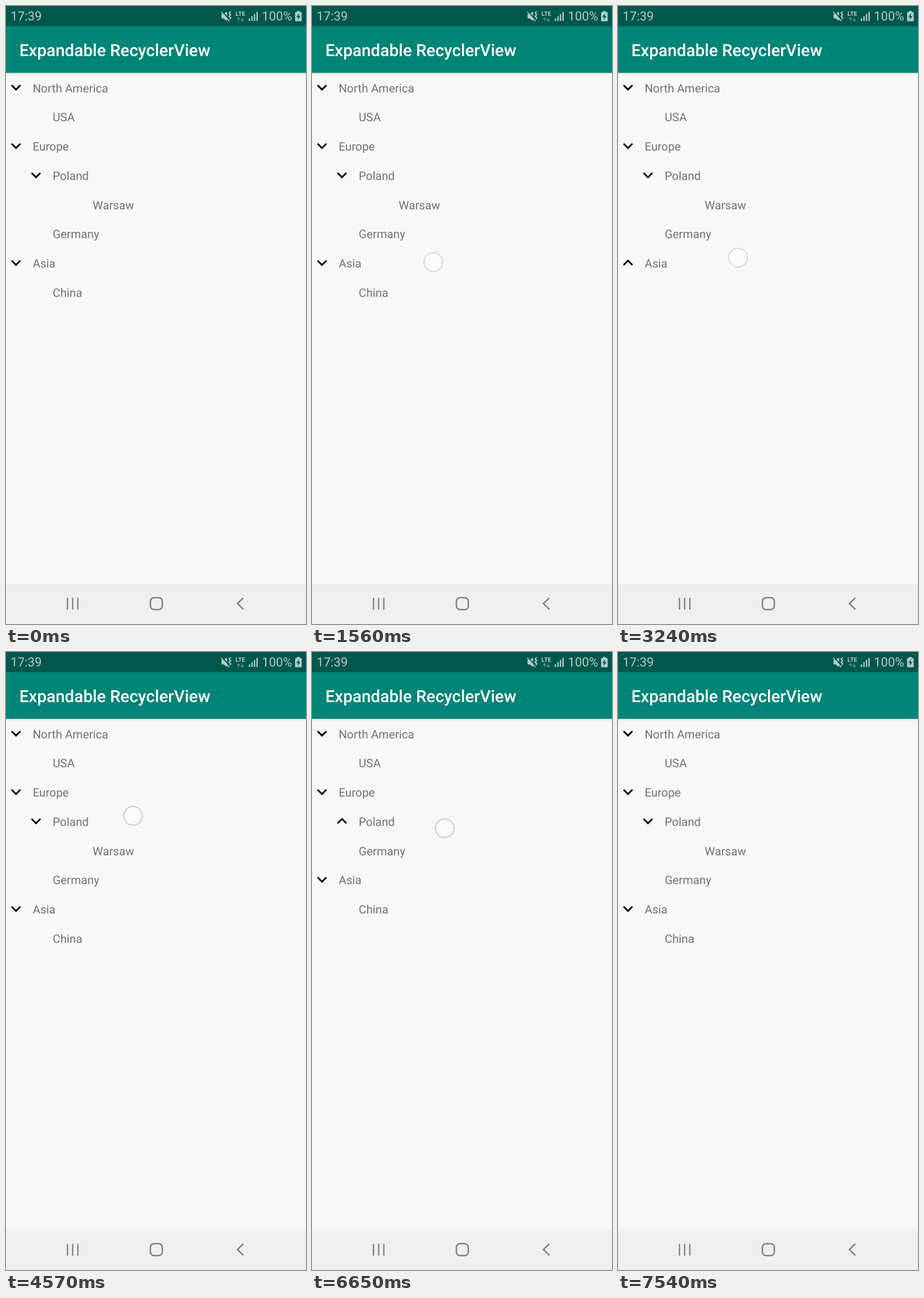
Write an HTML page with a canvas that moves like this. It is 522 px wide and 1073 px high and loops after 8000 ms.

```html
<!DOCTYPE html>
<html lang="en">
<head>
<meta charset="utf-8">
<title>Expandable RecyclerView</title>
<style>
  html, body { margin: 0; width: 100%; height: 100%; overflow: hidden; background: #f8f8f7; }
  canvas { display: block; width: 522px; height: 1073px; }
</style>
</head>
<body>
<canvas id="stage" width="522" height="1073"></canvas>
<script>
const ctx = document.getElementById('stage').getContext('2d');
const LOOP = 8000;
const DP = 1.45;
const ROW = 35 * DP;
const TOP = 116;
const FONT = 'Roboto, sans-serif';
const STATUS_BG = '#00574b';
const STATUS_INK = '#b3cdc9';

// Unhinted glyph spacing, as on a scaled-down phone screen
ctx.textRendering = 'geometricPrecision';

const clamp = v => Math.max(0, Math.min(1, v));
const progress = (t, from, to) => clamp((t - from) / (to - from));
const ease = p => 0.5 - Math.cos(p * Math.PI) / 2;
const mix = (a, b, p) => a + (b - a) * p;
// 1 at rest, drops to 0 over the first span and returns over the second
const dip = (t, a, b, c, d) => 1 - progress(t, a, b) + progress(t, c, d);

// Each touch: start, end, and the points the finger drifts through
const touches = [
  { from: 1330, to: 1970, path: [[211, 445], [211, 444]] },
  { from: 2860, to: 3690, path: [[213, 435], [208.5, 437], [209.5, 438.5]] },
  { from: 4570, to: 4915, path: [[221, 284.5], [228.5, 288]] },
  { from: 5120, to: 5670, path: [[222, 285], [223.5, 286.5], [225, 286]] },
  { from: 6650, to: 7535, path: [[231, 306], [234, 297], [233, 298.5]] }
];

function rect(x, y, w, h, color) {
  ctx.fillStyle = color;
  ctx.fillRect(x, y, w, h);
}

function text(str, x, y, size, color, weight = 400) {
  ctx.font = `${weight} ${size}px ${FONT}`;
  ctx.fillStyle = color;
  ctx.fillText(str, x, y);
}

function trace(points, close) {
  ctx.beginPath();
  points.forEach(([x, y]) => ctx.lineTo(x, y));
  if (close) ctx.closePath();
}

function fillShape(points, color) {
  trace(points, true);
  ctx.fillStyle = color;
  ctx.fill();
}

function strokeLine(points, color, width) {
  trace(points);
  ctx.strokeStyle = color;
  ctx.lineWidth = width;
  ctx.stroke();
}

function roundRect(x, y, w, h, r) {
  ctx.beginPath();
  ctx.roundRect(x, y, w, h, r);
}

function drawMute() {
  fillShape([[375, 14], [378.5, 14], [384.5, 9.5], [384.5, 26], [378.5, 21.5], [375, 21.5]], STATUS_INK);
  strokeLine([[375.8, 9.2], [389.8, 25.2]], STATUS_BG, 1.8);
  strokeLine([[374.5, 10.2], [388.5, 26.2]], STATUS_INK, 1.7);
  strokeLine([[391, 9.5], [388.2, 12.3], [391, 15], [388.2, 17.8], [391, 20.5], [389.5, 23]], STATUS_INK, 1.9);
}

function drawStatusBar() {
  rect(0, 0, 522, 35, STATUS_BG);
  text('17:39', 8, 25, 15 * DP, STATUS_INK);
  drawMute();

  text('LTE', 399.3, 17, 10.4, STATUS_INK, 700);
  const dim = '#5b9289';
  strokeLine([[404.6, 26.5], [404.6, 20.5]], dim, 1.4);
  strokeLine([[402, 23], [404.6, 20.2], [407.2, 23]], dim, 1.4);
  strokeLine([[411, 20], [411, 26]], dim, 1.4);
  strokeLine([[408.4, 23.5], [411, 26.3], [413.6, 23.5]], dim, 1.4);

  for (let i = 0; i < 4; i++) {
    const h = 4.5 + i * 3.8;
    rect(422.5 + i * 4.4, 26 - h, 2.3, h, STATUS_INK);
  }
  text('100%', 445.3, 25, 15 * DP, STATUS_INK);

  ctx.fillStyle = STATUS_INK;
  roundRect(503, 10.5, 11.5, 16, 1.5);
  ctx.fill();
  rect(506.2, 8.7, 5, 2.5, STATUS_INK);
  fillShape([[510, 12.5], [505, 19.3], [508.2, 19.3], [507.3, 24.5], [512.4, 17.5], [509.2, 17.5]], STATUS_BG);
}

function drawAppBar() {
  const shadow = ctx.createLinearGradient(0, TOP, 0, TOP + 6);
  shadow.addColorStop(0, 'rgba(0,0,0,0.13)');
  shadow.addColorStop(0.4, 'rgba(0,0,0,0.04)');
  shadow.addColorStop(1, 'rgba(0,0,0,0)');
  rect(0, TOP, 522, 6, shadow);
  rect(0, 35, 522, TOP - 35, '#008577');
  text('Expandable RecyclerView', 16 * DP, 87, 20 * DP, '#ffffff', 500);
}

function drawNavBar() {
  const ink = '#828282';
  rect(0, 1003, 522, 70, '#efefee');
  for (const x of [107, 116, 125]) strokeLine([[x, 1027.5], [x, 1048]], ink, 2.4);
  ctx.strokeStyle = ink;
  ctx.lineWidth = 2.6;
  roundRect(251.2, 1027.2, 20.8, 20.8, 6.5);
  ctx.stroke();
  strokeLine([[413, 1027.5], [402.7, 1037.5], [413, 1047.7]], ink, 2.5);
}

// Arrow outlines live on a 24-unit grid
const arrowDown = [[7.41, 8.59], [12, 13.17], [16.59, 8.59], [18, 10], [12, 16], [6, 10]];
const arrowUp = arrowDown.map(([x, y]) => [x, 24 - y]);

function drawArrow(x, centerY, open) {
  const place = ([px, py]) => [x + px * DP, centerY + (py - 12) * DP];
  const alpha = ctx.globalAlpha;
  for (const [shape, share] of [[arrowDown, open], [arrowUp, 1 - open]]) {
    ctx.globalAlpha = alpha * share;
    fillShape(shape.map(place), '#000000');
  }
  ctx.globalAlpha = alpha;
}

function drawRow({ label, x, pos, arrow, alpha = 1 }) {
  const y = TOP + ROW * (pos + 0.5);
  ctx.globalAlpha = alpha;
  if (arrow !== undefined) drawArrow(x - 32 * DP, y, arrow);
  text(label, x, y + 8.25, 14 * DP, '#727272');
  ctx.globalAlpha = 1;
}

function drawList(t) {
  const asiaOpen = dip(t, 1700, 1850, 3345, 3540);
  const chinaAlpha = dip(t, 1700, 1820, 3430, 3560);
  const polandOpen = dip(t, 5385, 5560, 7075, 7270);
  const warsawAlpha = dip(t, 5385, 5500, 7310, 7435);
  const slot = ease(dip(t, 5470, 5675, 7075, 7320));
  const [first, second, third] = [32, 56, 104].map(v => v * DP);

  [
    { label: 'North America', x: first, pos: 0, arrow: 1 },
    { label: 'USA', x: second, pos: 1 },
    { label: 'Europe', x: first, pos: 2, arrow: 1 },
    { label: 'Poland', x: second, pos: 3, arrow: polandOpen },
    { label: 'Warsaw', x: third, pos: 4, alpha: warsawAlpha },
    { label: 'Germany', x: second, pos: 4 + slot },
    { label: 'Asia', x: first, pos: 5 + slot, arrow: asiaOpen },
    { label: 'China', x: second, pos: 6 + slot, alpha: chinaAlpha }
  ].forEach(drawRow);
}

function drawTouch(t) {
  const touch = touches.find(({ from, to }) => t >= from && t < to);
  if (!touch) return;
  const { from, to, path } = touch;
  const along = progress(t, from, to) * (path.length - 1);
  const i = Math.min(Math.floor(along), path.length - 2);
  const [x, y] = path[i].map((v, k) => mix(v, path[i + 1][k], along - i));

  ctx.globalAlpha = mix(1, 0.75, progress(t, from + 30, from + 150)) * (1 - progress(t, to - 30, to));
  ctx.beginPath();
  ctx.arc(x, y, 16.2, 0, Math.PI * 2);
  ctx.fillStyle = 'rgba(255,255,255,0.65)';
  ctx.fill();
  ctx.strokeStyle = '#c1c2e4';
  ctx.lineWidth = 1.8;
  ctx.stroke();
  ctx.globalAlpha = 1;
}

function draw(t) {
  rect(0, 0, 522, 1073, '#f8f8f7');
  drawList(t);
  drawAppBar();
  drawStatusBar();
  drawNavBar();
  drawTouch(t);
}

const start = performance.now();
function tick() {
  draw((performance.now() - start) % LOOP);
  requestAnimationFrame(tick);
}
tick();
</script>
</body>
</html>
```
